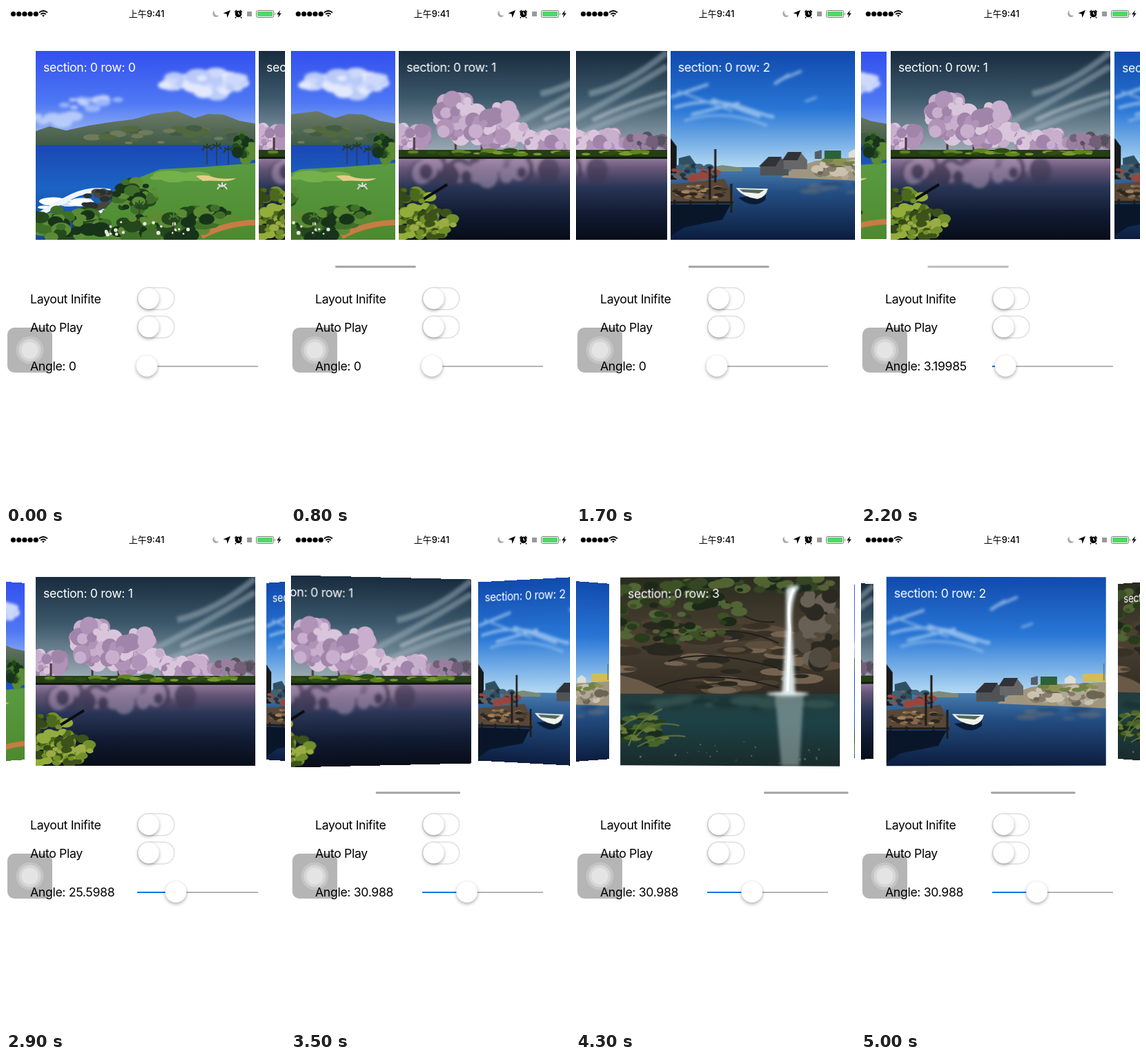
These frames come from a looping animation (404 px wide and 720 px high, 5.1 s). An HTML page:

```html
<!DOCTYPE html>
<html lang="en">
<head>
<meta charset="utf-8">
<title>Carousel layout</title>
<style>
html, body { margin: 0; width: 100%; height: 100%; overflow: hidden; background: #fff; }
#stage { position: relative; width: 404px; height: 720px; overflow: hidden; }
svg { position: absolute; left: 0; top: 0; }
text { font: 17.7px Inter, Roboto, sans-serif; letter-spacing: -.35px; }
.card { position: absolute; left: 0; top: 65px; width: 318px; height: 273px; overflow: hidden; }
.card text { fill: #fff; }
.knob { fill: #fff; filter: drop-shadow(0 2px 2.5px #0005); }
#time { font: 500 13px Inter, "Noto Sans CJK SC", "Noto Sans CJK", sans-serif; letter-spacing: 0; }
</style>
</head>
<body>
<div id="stage">
  <svg id="ui" width="404" height="720">
    <g id="dots"></g>
    <g fill="none" stroke="#000" stroke-width="1.7">
      <path d="M48 9.5q6-5 12 0M50.3 12q3.7-3 7.4 0"/>
      <path d="M52.6 13.6h2.8L54 15.3z" fill="#000" stroke-width=".8"/>
    </g>
    <text id="time" x="203.5" y="16" text-anchor="middle">上午9:41</text>
    <path d="M302 6.5a5 5 0 1 0 6.5 7a5.2 5.2 0 0 1-6.5-7z" fill="#aaa"/>
    <path d="M325 6l-4.5 11-1-5.5-5-1z"/>
    <circle cx="336.5" cy="11.5" r="4.8"/>
    <path d="M331.3 9l2.6-3M341.7 9l-2.6-3M333 16l-1 1.5M340 16l1 1.5" stroke="#000" stroke-width="1.5"/>
    <path d="M336.5 8.5v3.2h2.3" fill="none" stroke="#fff"/>
    <rect x="349" y="8" width="7" height="7" fill="#999"/>
    <rect x="362.5" y="6.5" width="25" height="10" rx="2" fill="#fff" stroke="#777"/>
    <rect x="364" y="8" width="22" height="7" rx="1" fill="#4cd964"/>
    <path d="M389 9.5q2 2 0 4z" fill="#777"/>
    <path d="M397 6l-5 6.2h3l-1.3 4.8 5-6.4h-3z"/>

    <rect x="2" y="465" width="65" height="65" rx="10" fill="#b5b5b5"/>
    <g fill="#fff" transform="translate(34.5 497.5)">
      <circle r="20" opacity=".2"/><circle r="16" opacity=".3"/><circle r="12" opacity=".35"/>
    </g>

    <text x="35" y="430">Layout Inifite</text>
    <text x="35" y="471">Auto Play</text>
    <text id="angle" x="35" y="527"></text>
    <g id="switches"></g>

    <path d="M190 521H365" stroke="#b5b5b5" stroke-width="2.2"/>
    <path id="fill" stroke="#1274e0" stroke-width="2.2"/>
    <circle id="knob" class="knob" cy="520.5" r="15.3"/>
    <path id="bar" stroke="#a2a2a2" stroke-width="2.8" stroke-linecap="round"/>
  </svg>
</div>
<script>
const $ = id => document.getElementById(id);
const W = 318, H = 273, GAP = 5, LOOP = 5100, STEP = 100;

// Scene helpers
let defs = '';
function gradient(id, ...stops) {
  defs += `<linearGradient id="${id}" x2="0" y2="1">` +
    stops.map(([at, color]) => `<stop offset="${at}" stop-color="${color}"/>`).join('') + '</linearGradient>';
  return `url(#${id})`;
}
const rect = (fill, x, y, w, h) => `<rect x="${x}" y="${y}" width="${w}" height="${h}" fill="${fill}"/>`;
const path = (fill, d) => `<path fill="${fill}" d="${d}"/>`;
const line = (color, width, d) => `<path fill="none" stroke="${color}" stroke-width="${width}" d="${d}"/>`;
const soft = (opacity, body) => `<g filter="url(#soft)" opacity="${opacity}">${body}</g>`;

// Random ellipses inside an elliptical area
function clump(seed, n, cx, cy, rx, ry, size, colors, flat = 1) {
  const rnd = () => (seed = (seed * 16807) % 2147483647) / 2147483647;
  seed = seed * 7919 + 13; rnd();
  let out = '';
  for (let i = 0; i < n; i++) {
    const a = rnd() * 6.283, d = Math.sqrt(rnd()), r = size * (.5 + rnd());
    out += `<ellipse cx="${(cx + rx * d * Math.cos(a)).toFixed(1)}" cy="${(cy + ry * d * Math.sin(a)).toFixed(1)}"
      rx="${r.toFixed(1)}" ry="${(r * flat).toFixed(1)}" fill="${colors[i % colors.length]}"/>`;
  }
  return out;
}
const palm = (x, y, h, color) => line('#3a3626', 1.2, `M${x} ${y}v${h}`) +
  line(color, 2, `M${x - 7} ${y + 4}q4-7 7-4q3-3 7 4M${x - 6} ${y - 3}l6 3l6-4M${x} ${y}v-6`);

const leaves = ['#24481d', '#3f7029', '#17341a', '#5c8b35'];
const blossom = ['#c8afcd', '#b093b7', '#dac6dc', '#a184aa'];
const rocks = ['#b0a894', '#857c6b', '#cbc2ae', '#6c6554'];

const scenes = [
  () => rect(gradient('sky0', [0, '#3350ee'], [.6, '#4e78f4'], [1, '#9db9f2']), 0, 0, W, 125) +
    soft(.85, clump(3, 34, 250, 48, 70, 14, 13, ['#fff', '#e6edfd', '#cfdcfb'], .6) +
      clump(8, 14, 85, 76, 45, 9, 9, ['#a9c3fa', '#d5e1fd'], .45) +
      clump(5, 10, 25, 98, 40, 7, 10, ['#c3d4fb'], .5)) +
    path(gradient('hill0', [0, '#6c7a67'], [1, '#3c5944']),
      'M0 116L20 109 44 115 76 108 108 103 140 99 170 91 205 87 230 97 250 91 272 92 295 101 318 105V140H0z') +
    clump(4, 32, 170, 122, 140, 12, 10, ['#52683f', '#6f7a5a', '#425b45'], .35) +
    rect(gradient('sea0', [0, '#1c48b4'], [.45, '#1b63c4'], [1, '#154a9c']), 0, 136, W, H - 136) +
    clump(9, 10, 62, 222, 55, 11, 14, ['#fff', '#c9e0f4'], .28) +
    line('#eef5fb', 7, 'M0 240Q28 222 53 210T108 203') +
    clump(6, 16, 95, 215, 30, 12, 8, ['#2b3130', '#45483b'], .55) +
    path(gradient('lawn0', [0, '#5a9b42'], [1, '#4d8a2e']),
      'M108 220L145 185 180 171 240 168 318 162V273H60z') +
    clump(2, 8, 205, 184, 40, 6, 18, ['#74b04c'], .3) +
    path('#e5cd8a', 'M232 181Q245 178 256 182T290 184Q284 189 267 188T242 188z') +
    clump(10, 42, 142, 208, 32, 22, 8, leaves, .7) +
    line('#c87c45', 8, 'M240 268Q275 249 318 248') +
    clump(11, 65, 45, 250, 58, 22, 10, leaves, .7) +
    clump(12, 60, 175, 256, 70, 17, 10, leaves, .7) +
    clump(13, 44, 246, 240, 38, 16, 8, leaves, .7) +
    clump(14, 20, 155, 257, 100, 10, 2, ['#e8e8df']) +
    palm(248, 140, 24, '#243d20') + palm(262, 138, 27, '#243d20') + palm(279, 143, 22, '#243d20') +
    clump(15, 32, 304, 139, 14, 17, 6, leaves) +
    palm(150, 222, 34, '#28572a') + palm(200, 240, 30, '#457b2e') + palm(270, 196, 4, '#ddd'),

  () => rect(gradient('sky1', [0, '#182c3e'], [.45, '#3c586b'], [1, '#a0b0b9']), 0, 0, W, 150) +
    soft(.5, line('#a3b5c0', 9, 'M170 105Q240 70 318 22M205 62Q260 50 318 2M180 125Q250 94 318 72') +
      line('#d0dae0', 6, 'M210 100Q260 76 318 60')) +
    clump(21, 40, 20, 127, 28, 18, 8, blossom) +
    line('#4c3546', 3, 'M82 148V92M140 146V100M120 146V118M22 147V125') +
    clump(22, 75, 84, 96, 28, 32, 9, blossom) +
    clump(23, 82, 140, 108, 42, 28, 9, blossom) +
    clump(24, 55, 217, 130, 42, 13, 8, blossom) +
    clump(25, 40, 290, 131, 35, 8, 6, ['#745f78', '#53525e', '#9b7fa0']) +
    rect(gradient('lake1', [0, '#9d83a6'], [.16, '#655577'], [.38, '#293555'], [.7, '#101a31'], [1, '#080d18']),
      0, 151, W, H - 151) +
    soft(.5, clump(26, 32, 110, 170, 110, 14, 12, ['#b59cbb', '#37304b'], 1.2)) +
    rect('#253e15', 0, 143, W, 11) +
    clump(27, 35, 160, 147, 158, 3, 8, ['#5c8420', '#304d14', '#7a992e'], .3) +
    rect('#11190f', 0, 153, W, 3) +
    clump(28, 70, 20, 235, 32, 38, 8, ['#71902a', '#4d691d', '#93ad3c', '#354a18'], .7) +
    clump(29, 42, 50, 250, 30, 20, 7, ['#71902a', '#9aac43', '#3d511a'], .7) +
    line('#0d0c13', 4, 'M36 214L70 193'),

  () => rect(gradient('sky2', [0, '#104aad'], [.5, '#2977d6'], [1, '#b5dbf3']), 0, 0, W, 169) +
    soft(.6, line('#d7ebfb', 4, 'M0 67L55 48M5 82Q60 65 110 83T145 93M30 92L100 75M60 70L130 95M150 48L172 34M156 43L190 29') +
      line('#b5d7f5', 3, 'M20 101Q80 82 140 108M10 58L90 87M195 73L212 67')) +
    rect(gradient('bay2', [0, '#487daf'], [.35, '#244e83'], [1, '#0c1d3f']), 0, 168, W, H - 168) +
    path('#7d8b78', 'M55 169L75 165 104 169V174H55z') +
    path('#a0967f', 'M160 183L180 169 210 159 250 155 318 152V190L255 187z') +
    clump(31, 60, 263, 172, 55, 12, 7, rocks, .65) +
    clump(32, 16, 270, 160, 48, 4, 7, ['#6f8145', '#8c9153'], .4) +
    path('#4f5356', 'M130 166L142 154 160 154 171 166V180H130z') +
    path('#686767', 'M164 157L171 147 189 147 198 158V171H164z') +
    path('#303238', 'M128 167L142 153 161 153 152 167zM162 158L170 146 190 146 184 158z') +
    path('#2d6137', 'M223 144H247V156H223z') + path('#dedfd8', 'M258 154V147L266 142 274 147V154z') +
    path('#d2bd57', 'M284 140H317V152H284z') + path('#555c66', 'M209 146L219 143V156H209z') +
    line('#4d4d49', 1, 'M315 125V150') +
    path('#17191b', 'M0 126L9 138V186H0z') + path('#2d5063', 'M12 155L28 151 37 164V178H12z') +
    clump(33, 34, 34, 175, 34, 10, 6, ['#283241', '#67605c', '#9a463e', '#3b637b'], .6) +
    path('#584839', 'M0 193L78 185 91 210 90 220H0z') +
    clump(34, 48, 42, 204, 40, 10, 5, ['#85684a', '#443629', '#a4835d', '#2b251e'], .4) +
    line('#201c19', 3, 'M65 142V190M57 168V215M88 192V234M6 215V260M29 216V250M68 216V240M0 219H91') +
    path('#09162a', 'M0 222H87L75 244 20 255 0 268z') + path('#0b1b36', 'M98 212Q120 230 138 215V207z') +
    path('#f1f3ed', 'M95 198Q116 199 141 199Q138 212 126 214Q104 211 95 198z') +
    path('#51685a', 'M100 200L136 201 128 206 105 204z') +
    soft(.4, clump(35, 14, 240, 197, 75, 8, 12, ['#7e7a70', '#163458'], .25)),

  () => rect(gradient('cliff3', [0, '#2a2b1f'], [.5, '#4a4032'], [1, '#302b22']), 0, 0, W, 175) +
    clump(41, 80, 145, 112, 165, 55, 22, ['#5c4d3c', '#393126', '#746350', '#282820', '#4b4030'], .24) +
    clump(42, 40, 285, 70, 30, 70, 11, ['#514a3e', '#2c2922', '#696055'], .9) +
    line('#201d19', 2, 'M70 122Q125 102 230 132M40 165Q120 127 230 160M120 80Q180 72 230 96M145 25Q180 70 225 65') +
    clump(43, 105, 75, 50, 105, 45, 8, ['#283b1a', '#3c5226', '#1c2918', '#516435'], .6) +
    clump(44, 38, 210, 10, 100, 12, 9, ['#344623', '#1b281b', '#526332'], .6) +
    path('#6b5947', 'M0 142L27 149 65 166 48 178 0 183z') +
    rect(gradient('pool3', [0, '#233d3c'], [.4, '#1d4146'], [1, '#1a2b2b']), 0, 169, W, H - 169) +
    soft(.45, clump(45, 20, 150, 184, 150, 12, 18, ['#44635b', '#14282a'], .25) +
      path('#c2d4d3', 'M225 170H266L260 273H234z')) +
    soft(1, path('#d9e3e4', 'M241 18Q252 9 260 15Q248 28 249 70L254 168H235L241 72z') +
      `<ellipse cx="243" cy="169" rx="30" ry="3" fill="#e5eeee"/>`) +
    line('#fff', 4, 'M252 18Q242 32 246 75L243 165') +
    clump(46, 58, 31, 222, 40, 22, 8, ['#253c1f', '#48642a', '#1a2c1c', '#687c38'], .45) +
    line('#60743a', 2, 'M12 245Q25 206 61 191M20 235Q42 205 86 215M25 246Q62 225 95 231M0 218Q25 197 55 202') +
    clump(47, 22, 160, 255, 140, 18, 1, ['#62786a'])
];

// The first picture returns once more after the last row.
const cards = [0, 1, 2, 3, 0].map((row, i) => {
  const card = document.createElement('div');
  card.className = 'card';
  const body = i < 4 ? `<g id="scene${row}">${scenes[row]()}</g>` : `<use href="#scene${row}"/>`;
  card.innerHTML = `<svg width="${W}" height="${H}">${body}<text x="11" y="30">section: 0 row: ${row}</text></svg>`;
  $('stage').append(card);
  return card;
});
$('ui').insertAdjacentHTML('afterbegin',
  `<defs>${defs}<filter id="soft"><feGaussianBlur stdDeviation="2"/></filter></defs>`);
$('dots').innerHTML = [0, 1, 2, 3, 4].map(i => `<circle cx="${10.5 + i * 8.2}" cy="11.5" r="3.6"/>`).join('');
$('switches').innerHTML = [423, 464].map(y =>
  `<rect x="190.8" y="${y - 15.7}" width="53" height="31.5" rx="15.7" fill="#fff" stroke="#e2e2e2" stroke-width="1.7"/>
   <circle class="knob" cx="206.5" cy="${y}" r="15.2"/>`).join('');

// Swipes: start, end, from page, to page
const swipes = [
  [560, 1002, 0, 1], [1100, 1520, 1, 2], [1562, 1982, 2, 1],
  [3357, 3777, 1, 2], [3953, 4403, 2, 3], [4590, 5070, 3, 2]
];
const angleKeys = [[2100, 0], [2900, 25.5988], [3200, 30.988]];
const clamp = u => Math.min(1, Math.max(0, u));
const ease = u => 1 - (1 - u * u) ** 3;

function angleAt(t) {
  let angle = 0;
  for (let i = 1; i < angleKeys.length; i++) {
    const [t0, a0] = angleKeys[i - 1], [t1, a1] = angleKeys[i];
    angle += (a1 - a0) * clamp((t - t0) / (t1 - t0));
  }
  return angle;
}

function draw(t) {
  let page = 0, barAlpha = 0;
  for (const [start, end, from, to] of swipes) {
    page += (to - from) * ease(clamp((t - start) / (end - start)));
    if (t >= start) barAlpha = clamp(1 - (t - end - 150) / 250);
  }
  const angle = angleAt(t);
  const pitch = W + GAP - 140 * (1 - Math.cos(angle * Math.PI / 180));

  cards.forEach((card, i) => {
    const d = i - page;
    card.style.visibility = Math.abs(d) < 2 ? 'visible' : 'hidden';
    card.style.transform =
      `translateX(${43 + d * pitch}px) perspective(1000px) rotateY(${-d * angle}deg)`;
  });

  const tilt = angle / 30.988, knobX = 204 + angle * 1.636;
  const barX = 4.8 - tilt + page * (93.2 - 1.3 * tilt);
  $('bar').setAttribute('d', `M${barX} 377h${114.2 + 5.5 * tilt}`);
  $('bar').setAttribute('opacity', barAlpha);
  $('angle').textContent = 'Angle: ' + Number(angle.toPrecision(6));
  $('fill').setAttribute('d', `M190 521H${knobX}`);
  $('knob').setAttribute('cx', knobX);
}

function tick() {
  draw(Math.floor(performance.now() % LOOP / STEP) * STEP);
  requestAnimationFrame(tick);
}
tick();
</script>
</body>
</html>
```
